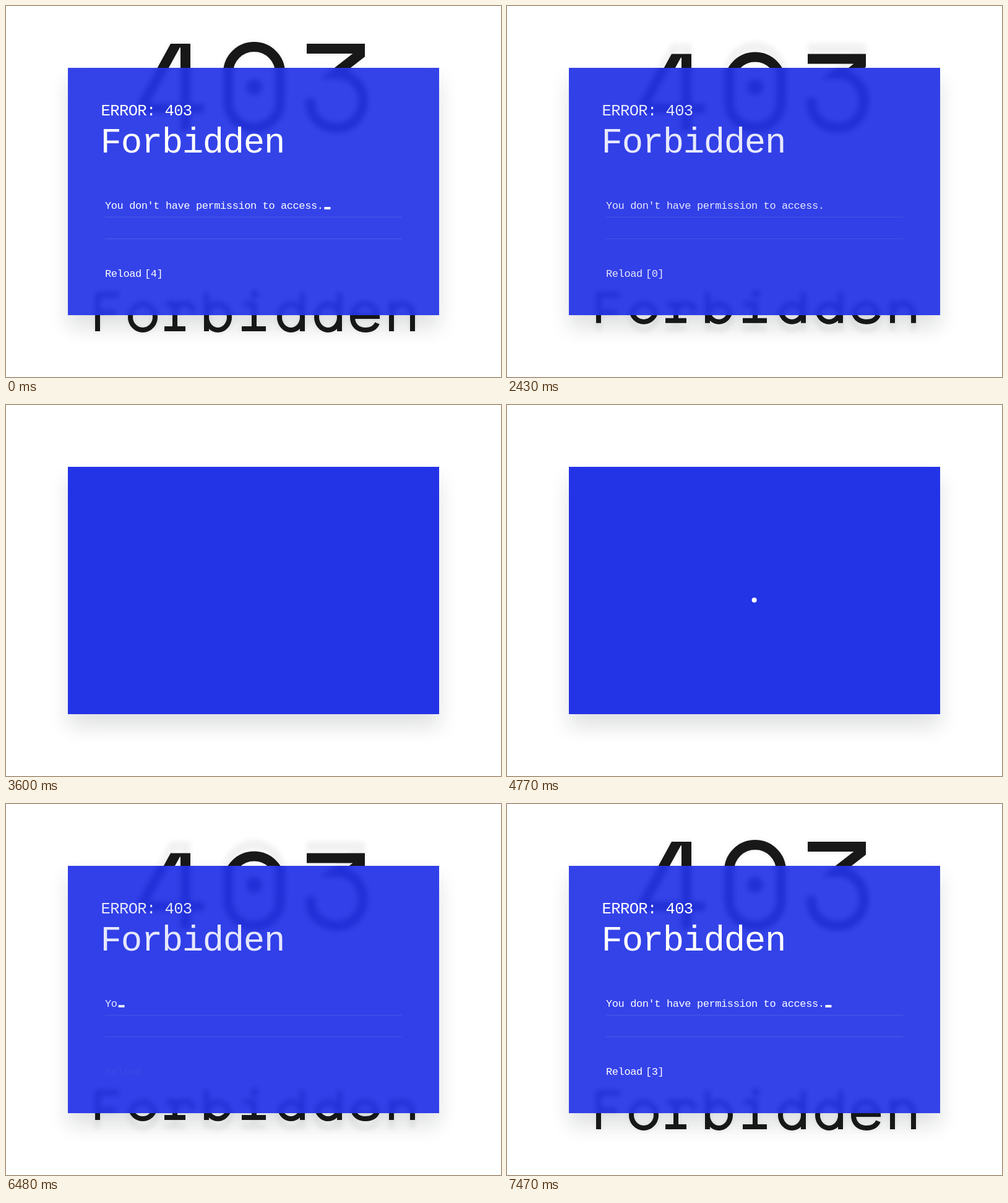
Write an HTML page that moves like this. It is 800x600 px and loops after 7.68 s.

```html
<!DOCTYPE html>
<html lang="en">
<head>
<meta charset="utf-8">
<title>403 Forbidden</title>
<style>
  html, body { margin: 0; width: 100%; height: 100%; overflow: hidden; background: #fff; }
  svg { position: absolute; left: 0; top: 0; width: 800px; height: 600px; }
  #panel {
    position: absolute; left: 100px; top: 100px; width: 600px; height: 400px;
    background: #2333e6; box-shadow: 0 20px 30px rgba(12, 20, 26, .13);
  }
  text { font-family: "Liberation Mono", monospace; fill: #fff; white-space: pre; }
  .error { font-size: 25.5px; letter-spacing: -.61px; }
  .title { font-size: 57.4px; letter-spacing: -1.4px; }
  .body { font-size: 17px; letter-spacing: -.41px; }
</style>
</head>
<body>
<svg viewBox="0 0 800 600" role="img" aria-label="403 Forbidden">
  <defs>
    <filter id="blur" x="-10%" y="-30%" width="120%" height="160%"><feGaussianBlur stdDeviation="4.5"/></filter>
    <clipPath id="box"><path d="M100 100h600v400h-600z"/></clipPath>
    <g id="num" fill="none" stroke="#181818" stroke-width="16">
      <path fill="#181818" stroke="none" fill-rule="evenodd"
        d="M266 61H298V158H320V173H298V202H282V173H213V158ZM281 67L231 158H282V67Z"/>
      <rect x="359" y="66" width="84" height="131" rx="42"/>
      <circle cx="401" cy="131" r="13" fill="#181818" stroke="none"/>
      <path d="M486 69H572V78L531 110H536A41 43.5 0 0 1 536 197C512 197 492 182 492 157"/>
      <circle cx="492" cy="157" r="9" fill="#181818" stroke="none"/>
    </g>
    <g id="word" fill="none" stroke="#181818" stroke-width="8"></g>
  </defs>
  <g id="ghost"><g filter="url(#blur)"><use href="#num"/><use href="#word"/></g></g>
  <use id="numUp" href="#num"/>
  <use id="wordDown" href="#word"/>
</svg>
<div id="panel"></div>
<svg viewBox="0 0 800 600">
  <g id="glass" clip-path="url(#box)">
    <path fill="#fff" d="M100 100h600v400h-600z"/>
    <g filter="url(#blur)"><use href="#num"/><use href="#word"/></g>
    <path fill="#2333e6" fill-opacity=".92" d="M100 100h600v400h-600z"/>
  </g>
  <g id="copy">
    <text class="error" x="153.6" y="176.5">ERROR: 403</text>
    <text class="title" x="152.6" y="237">Forbidden</text>
    <path d="M160 341.5H640M160 376.5H640" stroke="#fff" stroke-opacity=".12"/>
    <text class="body" id="typed" x="160" y="328"></text>
    <rect id="cursor" y="325" width="10" height="4" fill="#fff"/>
    <text class="body" id="reload" x="160" y="438">Reload</text>
    <text class="body" id="count" x="224" y="438"></text>
  </g>
  <g id="loader" fill="none" stroke="#fff" stroke-width="4.3">
    <circle cx="399.6" cy="315.5" r="4" fill="#fff" stroke="none"/>
    <ellipse cx="399.6" cy="306" rx="11.2" ry="11.8"/>
    <rect x="388.2" y="282.2" width="22.8" height="35.6" rx="11.4"/>
    <circle cx="399.6" cy="289.5" r="7"/>
  </g>
</svg>
<script>
const LOOP = 7680;
const MESSAGE = "You don't have permission to access.";
const ADVANCE = 9.79;
const $ = id => document.getElementById(id);

// Backdrop lettering, each glyph drawn around its centre on the baseline.
const ring = (cx, rx) => `M${cx - rx} -23a${rx} 21 0 1 0 ${2 * rx} 0a${rx} 21 0 1 0 ${-2 * rx} 0`;
const glyphs = {
  F: "M-12 0V-59H23M-12 -30H18",
  o: ring(1, 20),
  r: "M-24 -4H10M-22 -44H-7V-4M-7 -28C-7 -40 2 -45 10 -45S22 -40 22 -32",
  b: "M-16 0V-63" + ring(2.5, 18.5),
  i: "M-19 -4H20M-17 -44H1V-4M2 -66v12M-4 -60h12",
  d: "M19 0V-63" + ring(.5, 18.5),
  e: "M-19 -24H20A20 21 0 0 0 -20 -23C-20 -10 -12 -2 1 -2C10 -2 17 -6 20 -13",
  n: "M-17 0V-48M-17 -26A17 19 0 0 1 17 -26V0"
};
$("word").innerHTML = [..."Forbidden"].map((c, k) =>
  `<path transform="translate(${160 + 60 * k} 526)" d="${glyphs[c]}"/>`).join("");

const clamp = x => Math.min(1, Math.max(0, x));

// cubic-bezier(.25, .1, .25, 1)
function ease(x) {
  x = clamp(x);
  let lo = 0, hi = 1;
  for (let k = 0; k < 20; k++) {
    const s = (lo + hi) / 2, q = 1 - s;
    if (.75 * q * q * s + .75 * q * s * s + s * s * s < x) lo = s; else hi = s;
  }
  const q = 1 - lo;
  return .3 * q * q * lo + 3 * q * lo * lo + lo ** 3;
}

const ramp = (t, start, span) => ease((t - start) / span);
const loaderStarts = [3000, 3900, 4770, 5670];
const dots = [...$("loader").children];

function draw(t) {
  const returning = t > 4000;
  const shown = returning ? ramp(t, 6305, 300) : 1 - ramp(t, 2398, 300);
  const hidden = 1 - shown;

  $("glass").style.opacity = shown;
  $("copy").style.opacity = shown;
  $("ghost").style.opacity = .07 * shown;
  $("numUp").setAttribute("transform", `translate(0 ${150 * hidden})`);
  $("wordDown").setAttribute("transform", `translate(0 ${-120 * hidden})`);

  const typing = t >= 6420;
  const chars = returning ? Math.max(0, Math.min(MESSAGE.length, Math.floor((t - 6420) / 29))) : MESSAGE.length;
  $("typed").textContent = MESSAGE.slice(0, chars);
  $("cursor").setAttribute("x", 162 + ADVANCE * chars);
  const lit = typing || (t < 2250 && Math.floor(t / 450) % 2 === 0);
  $("cursor").style.opacity = lit ? 1 : 0;

  $("reload").style.opacity = returning ? clamp((t - 6470) / 200) : 1;
  $("count").style.opacity = returning ? clamp((t - 6700) / 200) : 1;
  $("count").textContent = `[${returning ? 3 : 3 - Math.min(3, Math.floor(t / 30 / 23 - 1 / 23 + 1e-6))}]`;

  const start = loaderStarts.findLast(s => t >= s);
  const step = start === undefined ? -1 : Math.floor((t - start) / 150);
  dots.forEach((dot, k) => { dot.style.display = k === step ? "" : "none"; });
}

const begin = performance.now();
function tick() {
  draw((performance.now() - begin) % LOOP);
  requestAnimationFrame(tick);
}
tick();
</script>
</body>
</html>
```
